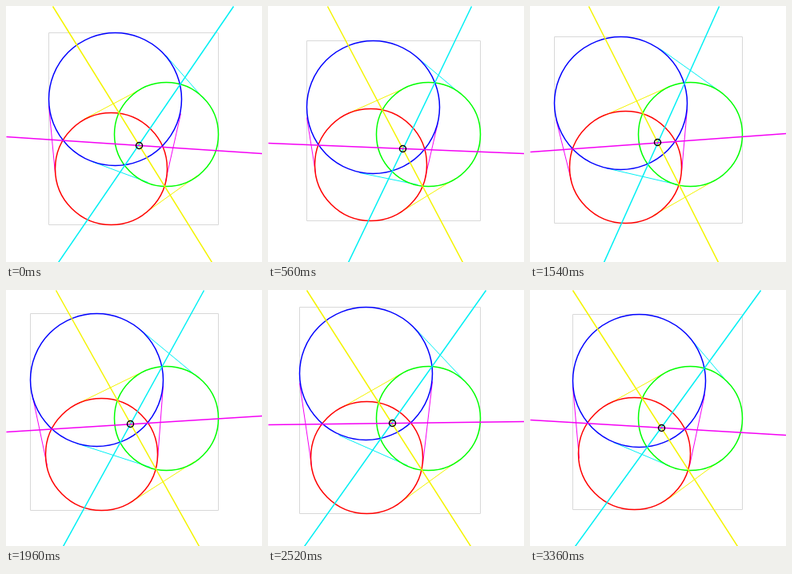
An HTML page with a canvas for the animation above (3500 ms loop, 320 by 320 pixels).

```html
<!DOCTYPE html>
<html>
<head>
<meta charset="utf-8">
<title>Radical center of three circles</title>
<style>
  html, body { margin: 0; width: 320px; height: 320px; overflow: hidden; background: #fff; }
  canvas { display: block; }
</style>
</head>
<body>
<canvas id="stage" width="320" height="320"></canvas>
<script>
const SIZE = 320, STEPS = 25, STEP_MS = 140;
const ctx = document.getElementById('stage').getContext('2d');
const snap = v => Math.round(v) + 0.5;

function stroke(color, width, path) {
  ctx.strokeStyle = color;
  ctx.lineWidth = width;
  ctx.beginPath();
  path();
  ctx.stroke();
}

function line(color, width, x1, y1, x2, y2) {
  stroke(color, width, () => {
    ctx.moveTo(snap(x1), snap(y1));
    ctx.lineTo(snap(x2), snap(y2));
  });
}

function circle(color, { x, y, r }) {
  stroke(color, 1.5, () => ctx.arc(snap(x), snap(y), Math.round(r), 0, 2 * Math.PI));
}

// Both outer common tangents, from touching point to touching point
function tangents(color, p, q) {
  const dx = q.x - p.x, dy = q.y - p.y, d = Math.hypot(dx, dy);
  const axis = Math.atan2(dy, dx), spread = Math.acos((p.r - q.r) / d);
  for (const a of [axis - spread, axis + spread]) {
    const c = Math.cos(a), s = Math.sin(a);
    line(color, 1, p.x + p.r * c, p.y + p.r * s, q.x + q.r * c, q.y + q.r * s);
  }
}

// Points of equal power satisfy a*x + b*y = c
function radicalAxis(p, q) {
  const k = o => o.x ** 2 + o.y ** 2 - o.r ** 2;
  return { a: 2 * (q.x - p.x), b: 2 * (q.y - p.y), c: k(q) - k(p) };
}

function drawAxis(color, { a, b, c }) {
  if (Math.abs(a) > Math.abs(b)) line(color, 1.5, c / a, -0.5, (c - b * SIZE) / a, SIZE);
  else line(color, 1.5, -0.5, c / b, SIZE, (c - a * SIZE) / b);
}

function intersect(m, n) {
  const det = m.a * n.b - n.a * m.b;
  return { x: (m.c * n.b - n.c * m.b) / det, y: (m.a * n.c - n.a * m.c) / det };
}

function drawBounds(circles) {
  const left = Math.min(...circles.map(o => snap(o.x) - Math.round(o.r)));
  const top = Math.min(...circles.map(o => snap(o.y) - Math.round(o.r)));
  const right = Math.max(...circles.map(o => snap(o.x) + Math.round(o.r)));
  const bottom = Math.max(...circles.map(o => snap(o.y) + Math.round(o.r)));
  stroke('#d8d8d8', 1, () => ctx.rect(left, top, right - left, bottom - top));
}

function draw(step) {
  const t = step / STEPS * 2 * Math.PI, c = Math.cos(t), s = Math.sin(t);
  const red = { x: 124.6 + 6 * c, y: 202.88 - 6 * s, r: 70 };
  const green = { x: 200, y: 159.7, r: 64.8 };
  const blue = { x: 124.3 + 12 * c, y: 116.2 + 12 * s, r: 83.4 };
  const pairs = [['#f4f400', red, green], ['#00f0f4', blue, green], ['#f400f4', blue, red]];
  const axes = pairs.map(([, p, q]) => radicalAxis(p, q));

  ctx.fillStyle = '#fff';
  ctx.fillRect(0, 0, SIZE, SIZE);
  drawBounds([red, green, blue]);
  for (const [color, p, q] of pairs) tangents(color, p, q);
  circle('#f00', red);
  circle('#0f0', green);
  circle('#00f', blue);
  pairs.forEach(([color], i) => drawAxis(color, axes[i]));
  circle('#000', { ...intersect(axes[0], axes[2]), r: 4 });
}

const start = performance.now();
function tick() {
  draw(Math.floor((performance.now() - start) / STEP_MS) % STEPS);
  requestAnimationFrame(tick);
}
tick();
</script>
</body>
</html>
```
